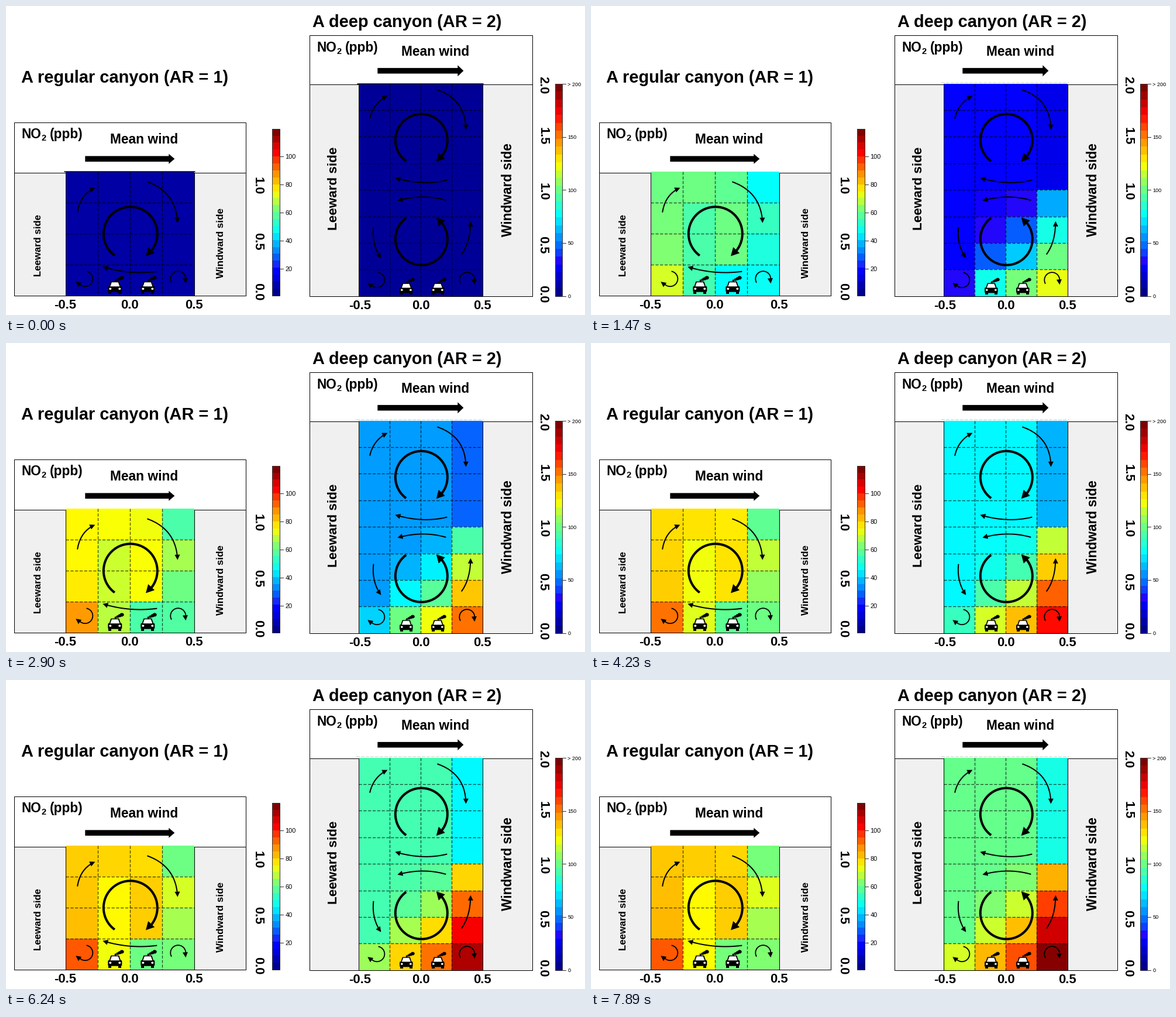
Animation of 990 by 528 pixels, one loop 8000 ms. Source, as a matplotlib script:

```python
import numpy as np
import matplotlib.pyplot as plt
from matplotlib.animation import FuncAnimation
from matplotlib.colors import LinearSegmentedColormap
from matplotlib.patches import Ellipse, FancyBboxPatch, Polygon, Rectangle

W, H, DPI = 990, 528, 100
LOOP, STEP = 8000, 25
START, TICK = 360, 68  # first update and time between updates, in ms
PT = 72 / DPI

plt.rcParams["font.family"] = "Liberation Sans"

JET = LinearSegmentedColormap.from_list("jet_like", [
    (0, "#00008f"), (0.125, "#0000ff"), (0.145, "#2400fa"), (0.2, "#0850ff"),
    (0.25, "#0082ff"), (0.375, "#00ffff"), (0.5, "#68ff88"), (0.625, "#ffff00"),
    (0.75, "#ff8a00"), (0.875, "#ff0000"), (1, "#7f0000")], N=128)


def saturate(t, tau, power=1.0):
    x = np.maximum(t - 300, 0) / tau
    return 1 - np.exp(-x ** power)


def regular_field():
    """One vortex: air thins out clockwise from the leeward ground corner."""
    row, col = np.mgrid[0:4, 0:4]
    angle = (225 - np.degrees(np.arctan2(1.5 - row, col - 1.5))) % 360
    ring = np.interp(angle, [0, 27, 153, 180, 207, 270, 297, 333, 360],
                     [0.80, 0.70, 0.67, 0.51, 0.60, 0.52, 0.51, 0.62, 0.80])
    core = np.hypot(row - 1.5, col - 1.5) < 1
    return np.where(core, 0.59 + 0.045 * col, ring)


def deep_field():
    """Slow build-up everywhere, fresh fumes rising on the windward side."""
    row, col = np.mgrid[0:8, 0:4]
    up, windward = 7 - row, col == 3
    slow = np.where(windward, np.where(up < 4, 0.56, 0.41), 0.505)
    slow[-1] = [0.60, 0.46, 0.43, 0.52]
    plume = (col / 3) ** 0.6 * (1 - up / 4.5).clip(0) ** (5.5 - 1.5 * col)
    fresh = np.where(up < 4, 0.48 * plume, 0)
    street = (up == 0) & (col > 0) & ~windward
    return up, slow, fresh, street


REGULAR = regular_field()
UP, SLOW, FRESH, STREET = deep_field()


def regular_values(t):
    return np.maximum(REGULAR * saturate(t, 780, 0.75), 0.03)


def deep_values(t):
    slow = SLOW * 1.05 * saturate(t, 3300, 1.2)
    fresh = FRESH * saturate(t - 90 * UP, 300)
    flare = 0.1 * STREET * np.exp(-((t - 910) / 500) ** 2) * (t > 0)
    return np.maximum(slow + fresh + flare, 0.015)


fig = plt.figure(figsize=(W / DPI, H / DPI), dpi=DPI, facecolor="white")
ax = fig.add_axes([0, 0, 1, 1])
# Whole numbers land inside their pixel, so thin lines snap to it
ax.set_xlim(-0.3, W - 0.3)
ax.set_ylim(H - 0.7, -0.7)
ax.axis("off")


def line(xs, ys, width=1.0, color="black", z=4, **kw):
    return ax.plot(xs, ys, color=color, lw=width * PT, zorder=z, **kw)[0]


def shape(pts, color="black", z=5):
    ax.add_patch(Polygon(pts, color=color, lw=0, zorder=z))


def box(x0, y0, x1, y1, fill="none", edge="black", z=1):
    ax.add_patch(Rectangle((x0, y0), x1 - x0, y1 - y0, facecolor=fill,
                           edgecolor=edge, lw=PT, zorder=z))


def label(x, y, s, size, ha="center", weight="bold", rot=0):
    ax.text(x, y, s, fontsize=size * PT, weight=weight, ha=ha, va="baseline",
            rotation=rot, rotation_mode="anchor", zorder=6)


def no2_label(x, y, size=22.6):
    label(x, y, "NO", size, "left")
    label(x + 1.5 * size, y + 4, "2", size * 0.65, "left")
    label(x + 2.14 * size, y, "(ppb)", size, "left")


def head(tip, way, length=9, half=4.5):
    tip, way = np.array(tip, float), np.array(way, float)
    way /= np.hypot(*way)
    side = half * np.array([-way[1], way[0]])
    base = tip - way * length
    shape([tip, base + side, base - side])


def curve(start, ctrl, tip):
    p0, p1, p2 = (np.array(p, float) for p in (start, ctrl, tip))
    u = np.linspace(0, 0.95, 40)[:, None]
    pts = (1 - u) ** 2 * p0 + 2 * u * (1 - u) * p1 + u ** 2 * p2
    line(pts[:, 0], pts[:, 1], 2)
    head(tip, p2 - p1)


def arc(cx, cy, r, a0, a1, width):
    a = np.radians(np.linspace(a0, a1, 80))
    line(cx + r * np.cos(a), cy + r * np.sin(a), width, solid_capstyle="butt")


def vortex(cx, cy, r, flip=1):
    arc(cx, cy, r, 126 * flip, 405 * flip, 4)
    head((cx + 0.57 * r, cy + 0.83 * r * flip), (-0.75, 0.8 * flip), 14, 7.5)


def swirls(left, right, y):
    arc(left, y, 13, -80, 150, 1.8)
    head((left - 16, y + 5), (-1, -0.75))
    arc(right, y, 13, 150, 372, 1.8)
    head((right + 13, y + 8), (0.1, 1))


def block_arrow(x0, x1, y, neck, half, shaft=4.8):
    shape([(x0, y - shaft), (neck, y - shaft), (neck, y - half), (x1, y),
           (neck, y + half), (neck, y + shaft), (x0, y + shaft)])


def car(cx, base, k=1.0):
    def poly(pts, color="black", z=5):
        shape([(cx + k * x, base + k * y) for x, y in pts], color, z)

    def blob(x, y, w, h, color="black", z=5):
        ax.add_patch(Ellipse((cx + k * x, base + k * y), k * w, k * h,
                             color=color, lw=0, zorder=z))

    poly([(-10, -12), (-7, -21), (7, -21), (10, -12)])
    poly([(-8, -12.5), (-5.5, -19.5), (5.5, -19.5), (8, -12.5)], "white", 6)
    ax.add_patch(FancyBboxPatch((cx - 10 * k, base - 11 * k), 20 * k, 6 * k,
                                boxstyle=f"round,pad={2 * k}", color="black",
                                lw=0, zorder=5))
    for s in (-1, 1):
        blob(s * 8, -8.5, 4, 3.5, "white", 6)
        poly([(s * 11, -5), (s * 6, -5), (s * 6, 0), (s * 11, 0)])
    for i in range(4):
        blob(1 + 3.6 * i, -22.5 - 1.6 * i, 3.5 + 1.2 * i, 3.5 + 0.9 * i)


def colorbar(x0, x1, top, bottom, bands):
    edges = np.linspace(bottom, top, bands + 1)
    for i in range(bands):
        box(x0, edges[i + 1], x1, edges[i], JET(i / (bands - 1)), "none", 2)
    box(x0, top, x1, bottom, edge="#333333", z=3)


def bar_tick(x, y, s, size, gap):
    line([x, x + 5], [y, y], 1, "#333333")
    label(x + gap, y + 0.36 * size, s, size, "left", "normal")


def canyon(x0, x1, top, roof, floor, xs, ys):
    """Draw sky box, walls and grid; return the cell mesh and its lid."""
    box(x0, roof, xs[0], floor, "#f0f0f0")
    box(xs[-1], roof, x1, floor, "#f0f0f0")
    box(x0, top, x1, floor, z=3)
    mesh = ax.pcolormesh(xs, ys, np.zeros((len(ys) - 1, 4)), cmap=JET,
                         vmin=0, vmax=1, zorder=2)
    for x in xs[1:-1]:
        line([x, x], [ys[0], floor], 1.3, alpha=0.7, z=3, dashes=(4, 2))
    for y in ys[1:-1]:
        line([xs[0], xs[-1]], [y, y], 1.3, alpha=0.7, z=3, dashes=(4, 2))
    for x in (xs[0], xs[-1]):
        line([x, x], [roof, floor])
    return mesh, line([xs[0] - 2, xs[-1] + 1], [ys[0], ys[0]], 1.5)


def axis_labels(xs, x_base, ys, y_base):
    for i, x in enumerate(xs):
        label(x, x_base, f"{i / 2 - 0.5:.1f}", 22)
    for i, y in enumerate(ys):
        label(y_base, y, f"{i / 2:.1f}", 21.8, rot=270)


# Regular canyon
label(203, 130, "A regular canyon (AR = 1)", 29)
mesh1, lid1 = canyon(14, 410, 198, 284, 494,
                     np.linspace(102, 322, 5), np.linspace(282, 494, 5))
no2_label(26, 225)
label(235.5, 234, "Mean wind", 22.7)
block_arrow(135, 288, 260.5, 278, 8.5)
label(59.5, 408, "Leeward side", 16.7, rot=90)
label(371.5, 404, "Windward side", 17, rot=90)
axis_labels((101, 211, 321), 516, (487, 401, 306), 424.5)
colorbar(455, 468, 209, 494, 24)
for v in range(20, 101, 20):
    bar_tick(469, 496 - 2.4 * v, str(v), 11, 8)
vortex(212.5, 388.5, 46)
curve((122, 351), (127, 321), (152, 310))
curve((242, 300), (291, 318), (293, 370))
curve((257, 453), (211, 459), (165, 445))
swirls(135, 294, 465.5)
car(186, 491)
car(242, 491)

# Deep canyon
label(685, 35, "A deep canyon (AR = 2)", 29)
mesh2, lid2 = canyon(519, 900, 49, 133, 495,
                     np.linspace(603, 815, 5), np.linspace(132, 495, 9))
no2_label(531, 77)
label(734, 84, "Mean wind", 22.7)
block_arrow(635, 782, 110, 772, 9.5)
label(565.5, 311, "Leeward side", 22.5, rot=90)
label(864.5, 313, "Windward side", 22.7, rot=90)
axis_labels((604.5, 709.5, 814.5), 517, (491, 407, 316, 221, 134), 912)
colorbar(939, 951, 132, 495, 27)
for v in range(0, 201, 50):
    bar_tick(952, 495 - 1.8125 * v, "> 200" if v == 200 else str(v), 9.2, 8)
vortex(710, 228.5, 44.5)
vortex(710, 397.5, 44.5, -1)
curve((622, 191), (628, 165), (652, 153))
curve((738, 143), (786, 160), (786, 211))
curve((753, 297), (712, 307), (665, 293))
curve((751, 331), (712, 320), (669, 332))
curve((628, 378), (625, 408), (641, 430))
curve((779, 423), (794, 402), (794, 367))
swirls(634, 788, 467.5)
car(684, 492.5, 0.94)
car(738, 492.5, 0.94)
haze = line([599, 817], [130, 130], 2, "#dde8dd", z=3, dashes=(3, 1))


def update(i):
    t = i * STEP
    started = t >= START
    shown = t - (t - START) % TICK if started else 0
    mesh1.set_array(regular_values(shown))
    mesh2.set_array(deep_values(shown))
    lid1.set_visible(not started)
    lid2.set_visible(not started)
    haze.set_visible(started)
    return mesh1, mesh2, lid1, lid2, haze


anim = FuncAnimation(fig, update, frames=LOOP // STEP, interval=STEP,
                     repeat=True, repeat_delay=0, blit=False)
plt.show()
```
